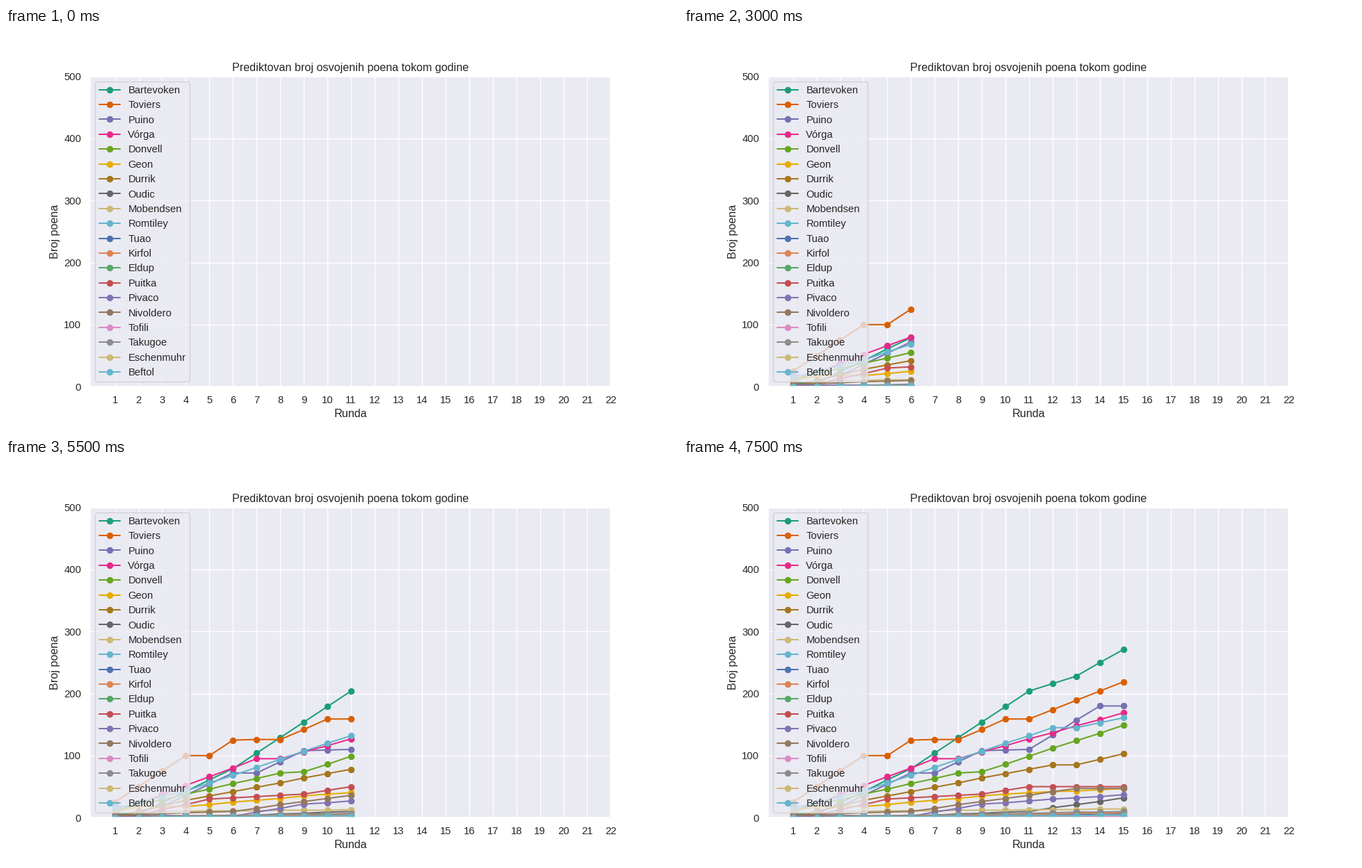
A matplotlib script for the animation above (8000 ms loop, 966 px wide and 580 px high).

```python
import numpy as np
import matplotlib.pyplot as plt
from matplotlib.animation import FuncAnimation

ROUNDS = 15
DPI = 96.6
INK = "#262626"
DEEP = ["#4C72B0", "#DD8452", "#55A868", "#C44E52", "#8172B3",
        "#937860", "#DA8BC3", "#8C8C8C", "#CCB974", "#64B5CD"]
COLORS = [*plt.cm.Dark2.colors, *DEEP[8:], *DEEP]

# Corner points (round, total), or just the total reached by a steady climb.
DRIVERS = {
    "Bartevoken": [(2, 6), (6, 79), (11, 204), (13, 228), (15, 271)],
    "Toviers": [(1, 25), (4, 100), (5, 100), (6, 125), (8, 126),
                (10, 159), (11, 159), (15, 219)],
    "Puino": [(3, 18), (6, 72), (7, 72), (9, 108), (11, 110), (14, 180)],
    "Vórga": [(1, 8), (7, 95), (8, 95), (15, 169)],
    "Donvell": [(1, 12), (8, 72), (9, 74), (15, 149)],
    "Geon": [(1, 10), (2, 18), (4, 18), (10, 38), (15, 47)],
    "Durrik": [(1, 1), (4, 28), (12, 85), (13, 85), (15, 103)],
    "Oudic": [(6, 3), (11, 10), (15, 32)],
    "Mobendsen": [(1, 2), (3, 10), (15, 14)],
    "Romtiley": [(1, 15), (4, 43), (12, 145), (13, 145), (15, 161)],
    "Tuao": 6,
    "Kirfol": 8,
    "Eldup": 1,
    "Puitka": [(2, 4), (5, 30), (9, 38), (11, 50)],
    "Pivaco": [(6, 2), (9, 22), (15, 37)],
    "Nivoldero": [(1, 4), (6, 10), (13, 47)],
    "Tofili": 2,
    "Takugoe": 10,
    "Eschenmuhr": 4,
    "Beftol": 4,
}

plt.rcParams.update({
    "font.family": "Liberation Sans",
    "font.size": 12,
    "text.color": INK,
    "axes.labelcolor": INK,
    "axes.labelsize": 12,
    "axes.titlesize": 12,
    "axes.facecolor": "#EAEAF2",
    "axes.edgecolor": "white",
    "axes.linewidth": 1.25,
    "axes.grid": True,
    "axes.axisbelow": True,
    "grid.color": "white",
    "grid.linewidth": 1,
    "lines.linewidth": 1.5,
    "lines.markersize": 6,
    "lines.solid_capstyle": "round",
    "legend.fontsize": 11,
    "xtick.bottom": False,
    "ytick.left": False,
})
for axis in ("xtick", "ytick"):
    plt.rcParams.update({
        f"{axis}.color": INK,
        f"{axis}.labelsize": 11,
        f"{axis}.major.size": 6,
    })

fig, ax = plt.subplots(figsize=(966 / DPI, 580 / DPI), dpi=DPI)
fig.subplots_adjust(left=0.125, right=0.9, bottom=0.11, top=0.88)
ax.set(xlim=(-0.055, 22), ylim=(0, 500),
       xticks=range(1, 23), yticks=range(0, 501, 100),
       title="Prediktovan broj osvojenih poena tokom godine",
       xlabel="Runda", ylabel="Broj poena")

rounds = np.arange(1, ROUNDS + 1)


def season(corners):
    """Whole-point running totals for every round."""
    if isinstance(corners, int):
        corners = [(1, 0), (ROUNDS, corners)]
    return np.round(np.interp(rounds, *zip(*corners)))


totals = [season(corners) for corners in DRIVERS.values()]
lines = [ax.plot([], [], "o-", color=color, label=name)[0]
         for name, color in zip(DRIVERS, COLORS)]
ax.legend(loc="upper left")


def update(count):
    for line, points in zip(lines, totals):
        line.set_data(rounds[:count], points[:count])
    return lines


anim = FuncAnimation(fig, update, frames=ROUNDS + 1, interval=500,
                     init_func=lambda: update(0), repeat=True, repeat_delay=0)
plt.show()
```
